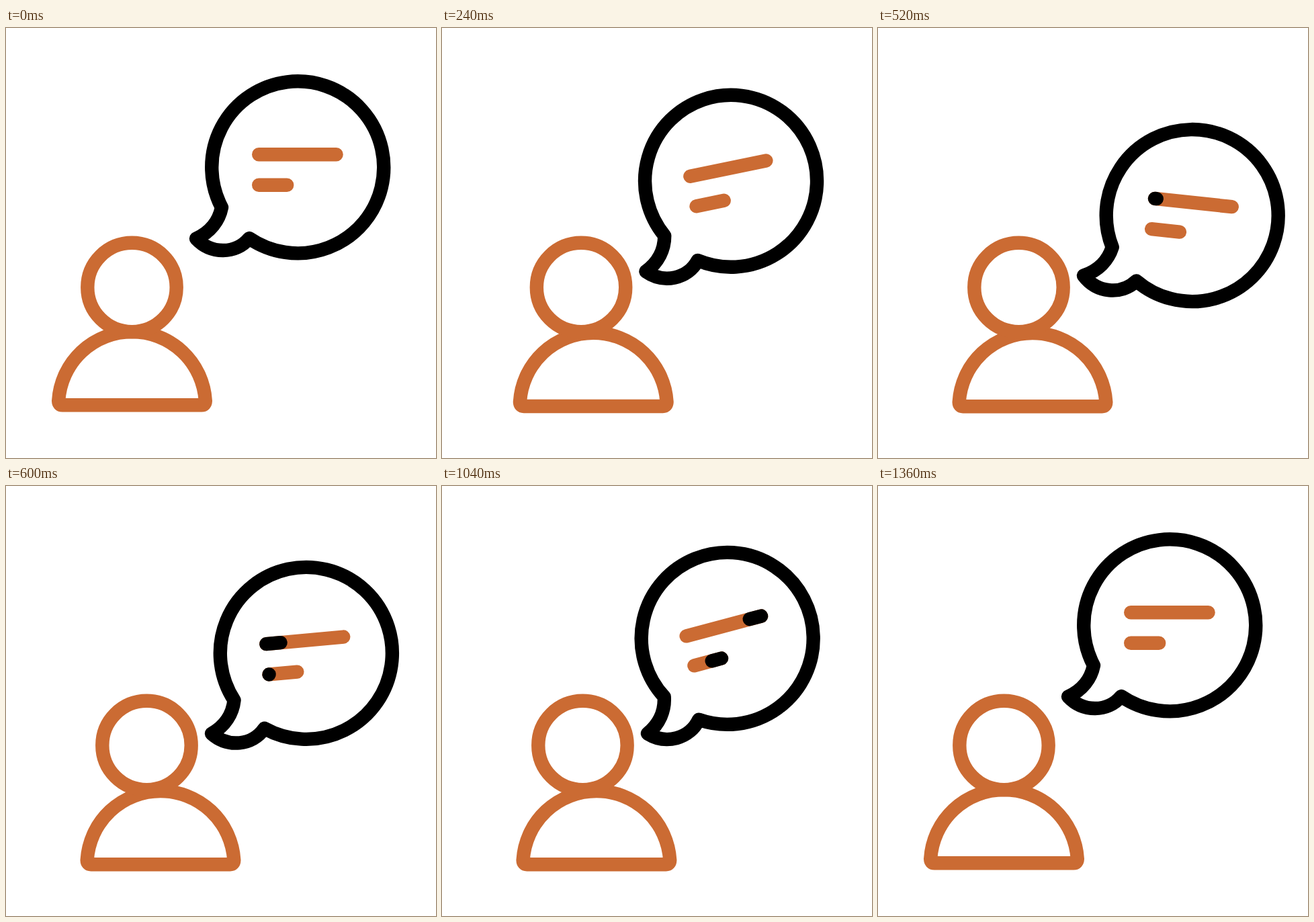
Write an HTML page that moves like this. It is 640x640 px and loops after 1.48 s.

```html
<!DOCTYPE html>
<html lang="en">
<head>
<meta charset="utf-8">
<title>Speaking person</title>
<style>
  html, body { margin: 0; width: 100%; height: 100%; overflow: hidden; background: #fff; }
  svg { display: block; width: 100vw; height: 100vh; }
  .ink { stroke: #000; }
  .warm { stroke: #cb6b33; }
</style>
</head>
<body>
<svg viewBox="0 0 640 640" fill="none" stroke-width="20.4" stroke-linecap="round" stroke-linejoin="round">
  <path id="body" class="warm" d="M78.2 555A109.5 109.5 0 0 1 296.8 555Q296.6 561.3 291 561.3H84Q78.4 561.3 78.2 555Z"/>
  <circle id="head" class="warm" cx="187.5" cy="386" r="66.2"/>
  <g id="bubble">
    <path class="ink" d="M321 267A128 128 0 1 1 362 313C342 337 305 337 283 313.5C304 304 317 287 321 267Z"/>
    <path class="warm" d="M376.2 188.2H491.6M376.2 233.7H418.2"/>
    <path id="mark1" class="ink"/>
    <path id="mark2" class="ink"/>
  </g>
</svg>
<script>
  const LOOP = 1480, STEP = 40, HOLD = 80, LAST = 32;
  const TIP = [283, 313.5];
  const el = id => document.getElementById(id);

  // Eased progress of step k between steps a and b
  function ease(k, a, b) {
    const u = Math.min(1, Math.max(0, (k - a) / (b - a)));
    return u * u * (3 - 2 * u);
  }

  // Eased value through [step, value] keys
  function track(k, keys) {
    let v = keys[0][1];
    for (let i = 1; i < keys.length; i++) {
      const [a, from] = keys[i - 1], [b, to] = keys[i];
      v += (to - from) * ease(k, a, b);
    }
    return v;
  }

  const lean = [[0, 0], [5.05, 1], [23.8, 1], [31.4, 0]];
  const drop = [[0, 0], [5.05, 1], [24, 1], [32, 0]];
  const tilt = [[0, 0], [5.75, -15], [10.6, 6.6], [15.1, -15], [23.8, -15], [31.5, 0]];

  function shift(id, x, y) {
    el(id).setAttribute('transform', `translate(${x} ${y})`);
  }

  // Dark stretch of a text line, from fraction a to fraction b
  function mark(id, x, y, len, a, b) {
    const on = b - a > 0.001;
    el(id).setAttribute('d', on ? `M${x + len * a} ${y}H${x + len * b}` : '');
  }

  function draw(ms) {
    const k = Math.min(LAST, Math.max(0, Math.floor((ms % LOOP - HOLD + 0.01) / STEP)));
    const p = track(k, lean), q = track(k, drop);
    shift('body', 42.5 * p, 1.9 * p);
    shift('head', 22 * p, 0);
    el('bubble').setAttribute('transform',
      `translate(${23 * q} ${55 * q}) rotate(${track(k, tilt)} ${TIP})`);
    mark('mark1', 376.2, 188.2, 115.4, ease(k, 15, 27), ease(k, 10, 20.9));
    mark('mark2', 376.2, 233.7, 42, ease(k, 18, 28), ease(k, 12.6, 23.4));
  }

  const start = performance.now();
  function tick() {
    draw(performance.now() - start);
    requestAnimationFrame(tick);
  }
  tick();
</script>
</body>
</html>
```
